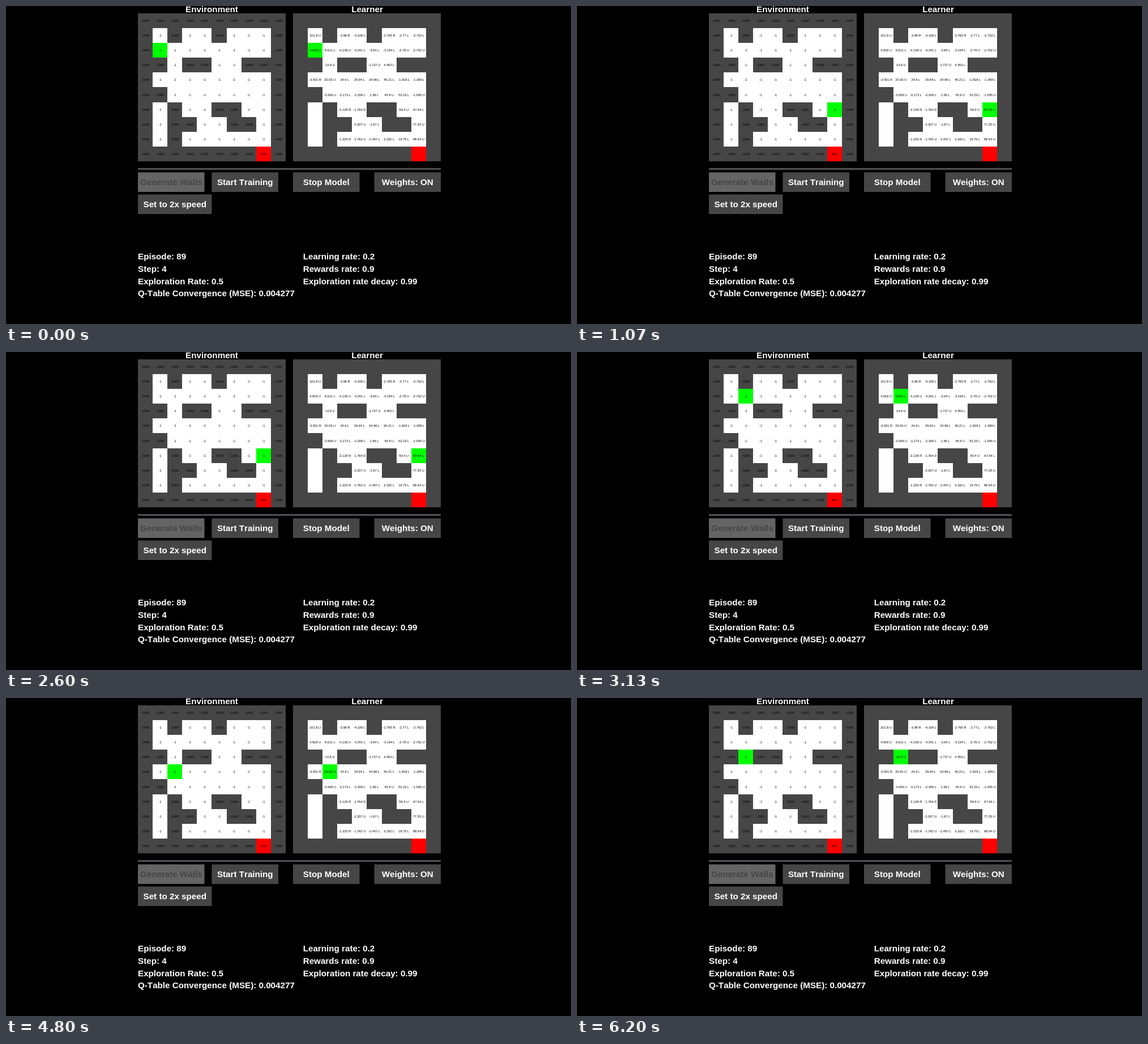
Recreate the animation shown at these times as an HTML page with a canvas. Size 998 by 561 pixels, loop 6270 ms.

```html
<!DOCTYPE html>
<html>
<head>
<meta charset="utf-8">
<style>
html, body { margin: 0; width: 100%; height: 100%; overflow: hidden; background: #000; }
canvas { display: block; }
</style>
</head>
<body>
<canvas id="stage" width="998" height="561"></canvas>
<script>
const ctx = document.getElementById('stage').getContext('2d');
const CELL = 26.1, TOP = 13, ENV = 233, LEARN = 507, LOOP = 6270;
const GRAY = '#464646', BIG = 'bold 15.2px', SMALL = '5.7px';

// Columns 1-8 of rows 1-8: '.' is a wall, '_' an open cell without a value
const values = [
  '101.8 U,.,-3.98 R,-4.109 L,.,-2.765 R,-2.77 L,-2.762 L',
  '4.818 U,9.611 L,-4.136 U,-4.241 L,-3.64 L,-3.194 L,-2.78 U,-2.762 U',
  '.,14.8 U,.,.,-1.727 U,4.453 L,.,.',
  '-3.501 R,20.03 U,24.9 L,29.94 L,34.96 L,40.21 L,-1.818 L,-1.389 L',
  '.,-3.509 U,-3.173 L,-2.209 L,1.56 L,45.9 U,52.23 L,-1.095 U',
  '_,.,-2.128 R,-1.764 D,.,.,59.4 U,67.64 L',
  '_,.,.,-2.207 U,-1.67 L,.,.,77.25 U',
  '_,.,-1.325 R,-1.762 U,-1.457 L,3.182 L,19.75 L,88.54 U'
].map(row => row.split(','));

// Agent's route from (1,1): one letter per move
const route = [[1, 1]];
for (const move of 'DRDDRRRRDRDRDD') {
  const [c, r] = route[route.length - 1];
  route.push(move === 'R' ? [c + 1, r] : [c, r + 1]);
}

const valueAt = (c, r) => (values[r - 1] || [])[c - 1] || '.';

function rect(x, y, w, h, color) {
  ctx.fillStyle = color;
  ctx.fillRect(x, y, w, h);
}

function text(str, x, y, size, color, align = 'center') {
  ctx.font = size + ' "Liberation Sans", Arial, sans-serif';
  ctx.fillStyle = color;
  ctx.textAlign = align;
  ctx.fillText(str, x, y);
}

function cell(left, c, r, color, label) {
  const edge = (start, i) => Math.floor(start + i * CELL + 0.4);
  const x = edge(left, c), y = edge(TOP, r);
  rect(x, y, edge(left, c + 1) - x, edge(TOP, r + 1) - y, color);
  text(label, left + (c + 0.5) * CELL, TOP + (r + 0.5) * CELL + 2, SMALL, '#000');
}

function drawGrids([ac, ar]) {
  for (let r = 0; r < 10; r++) {
    for (let c = 0; c < 10; c++) {
      const value = valueAt(c, r);
      const wall = value === '.', goal = c === 8 && r === 9;
      const color = goal ? '#f00' : c === ac && r === ar ? '#0f0' : wall ? GRAY : '#fff';
      cell(ENV, c, r, color, goal ? '100' : wall ? '-1000' : '-1');
      cell(LEARN, c, r, color, wall || value === '_' ? '' : value);
    }
  }
}

function button(label, x, y, w, bg = GRAY, fg = '#fff') {
  rect(x, y, w, 34.5, bg);
  text(label, x + w / 2, y + 22.5, BIG, fg);
}

function drawPanel() {
  text('Environment', 363.5, 11, BIG, '#fff');
  text('Learner', 638, 11, BIG, '#fff');
  rect(233, 287, 535, 1, '#d0d0dc');
  button('Generate Walls', 233, 293.5, 117.5, '#646464', GRAY);
  button('Start Training', 363.5, 293.5, 117.5);
  button('Stop Model', 507, 293.5, 117.5);
  button('Weights: ON', 650.5, 293.5, 117.5);
  button('Set to 2x speed', 233, 332.5, 130.5);
  const list = (x, lines) => lines.forEach((line, i) =>
    text(line, x, 447 + i * 21.8, BIG, '#fff', 'left'));
  list(233, ['Episode: 89', 'Step: 4', 'Exploration Rate: 0.5', 'Q-Table Convergence (MSE): 0.004277']);
  list(524.7, ['Learning rate: 0.2', 'Rewards rate: 0.9', 'Exploration rate decay: 0.99']);
}

function draw(now) {
  // The agent steps every 100 ms, shown at 15 pictures per second
  const tick = Math.min(93, Math.floor((now % LOOP + 5) * 15 / 1000));
  const step = Math.floor(1.5 + tick * 2 / 3) % route.length;
  rect(0, 0, 998, 561, '#000');
  drawGrids(route[step]);
  drawPanel();
}

ctx.fontKerning = 'none';
const start = performance.now();
function loop() {
  draw(performance.now() - start);
  requestAnimationFrame(loop);
}
loop();
</script>
</body>
</html>
```
